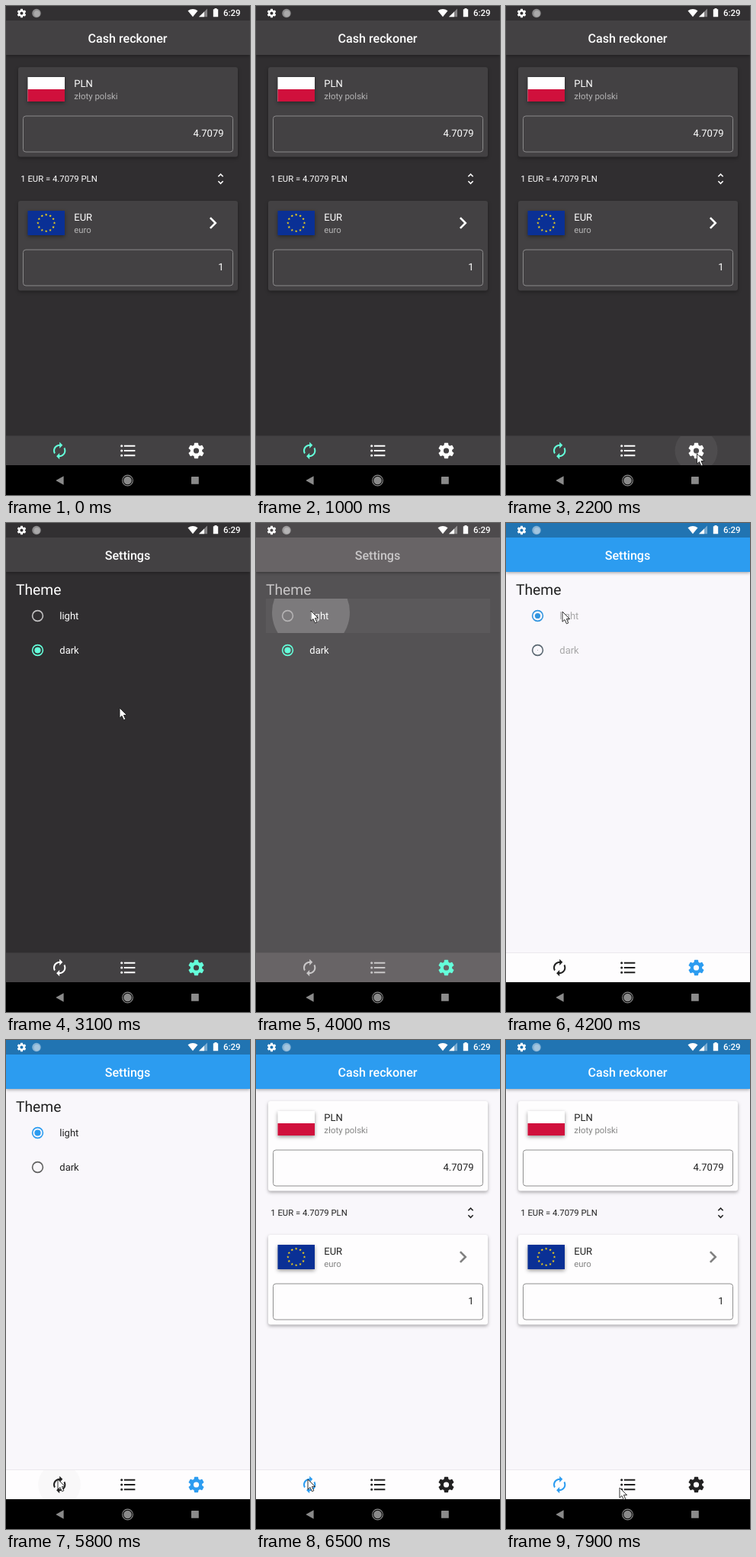
Animation, 320 px wide and 640 px high, one loop 8000 ms. Source, as an HTML page:

```html
<!DOCTYPE html>
<html lang="en">
<head>
<meta charset="utf-8">
<title>Currency app</title>
<style>
html, body { margin: 0; width: 100%; height: 100%; overflow: hidden; background: #000; }
svg { display: block; width: 320px; height: 640px; font-family: Roboto, "Noto Sans", sans-serif; text-rendering: geometricPrecision; }
.bar { fill: var(--bar); filter: drop-shadow(0 1.5px 2px rgba(0,0,0,.38)); }
.card { fill: var(--card); filter: drop-shadow(0 2px 2px rgba(0,0,0,.32)); }
.flag { filter: drop-shadow(0 2.5px 2.5px rgba(0,0,0,.4)); }
.text { fill: var(--text); }
.sub { fill: var(--sub); font-size: 11.4px; }
.label { fill: var(--label); }
.edge { fill: none; stroke: var(--edge); }
.m { font-size: 13px; }
.title { fill: var(--title); font-size: 16.1px; font-weight: 500; text-anchor: middle; }
.end { text-anchor: end; }
</style>
</head>
<body>
<svg id="stage" viewBox="0 0 320 640"></svg>
<script>
const LOOP = 8000, STEP = 100;

const KEYS = ['bar', 'bg', 'card', 'nav', 'title', 'text', 'sub', 'edge', 'icon', 'accent', 'chev', 'ring', 'line'];
const DARK = ['#434143', '#302e30', '#434143', '#434143', '#ffffff', '#ffffff', '#b4b3b4', '#8a898a', '#ffffff', '#64ffda', '#ffffff', '#c2c1c2', '#3a383a'];
const MID = ['#686466', '#545254', '#686466', '#686466', '#c9c7c8', '#c9c7c8', '#a8a7a8', '#8a898a', '#c9c7c8', '#64ffda', '#e0e0e0', '#b5b3b4', '#605d5f'];
const LIGHT = ['#2c9cf0', '#f9f7fb', '#fefdfe', '#fefdfe', '#ffffff', '#212121', '#868686', '#8f8f8f', '#212121', '#2c9cf0', '#808080', '#616161', '#ebe9ed'];

// Tracks: [time, value, ...], linear between rows
const THEME = [[3900, 0], [4000, 1], [4100, 1.62], [4200, 2]];
const PICK = [[4000, 0], [4100, .45], [4200, .88], [4300, 1]];
const LABEL = [[4100, 0], [4200, .39], [4300, .75], [4400, 1]];
const TAB = [[2200, 0], [2500, 1], [5800, 1], [6100, 0]];
const POINTER = [
  [1300, 326, 616], [1400, 312, 612], [1600, 284, 601], [1800, 263, 591], [2100, 250.5, 586],
  [2600, 250.5, 586], [2800, 230, 500], [3100, 149, 242], [3300, 95, 150], [3500, 72, 115],
  [4000, 72, 115], [4200, 74, 116], [4600, 74, 116], [4800, 80, 195], [5100, 85, 400],
  [5300, 74, 530], [5500, 68, 575], [6500, 68, 575], [6800, 95, 578], [7300, 140, 578],
  [7600, 149, 586]
];
// radius, opacity
const TILE = [[3700, 0, 0], [3800, 14, .2], [4000, 51, .2], [4100, 110, .12], [4200, 160, 0]];
const tapTrack = (t, o) => [[t - 200, 0, 0], [t - 100, 14, o], [t, 28, o], [t + 200, 48, o * .6], [t + 400, 54, 0]];
const TAP_GEAR = tapTrack(2200, .06), TAP_SWAP = tapTrack(5800, .02);

function at(track, t) {
  const i = track.findIndex(row => row[0] > t);
  if (i === 0) return track[0].slice(1);
  if (i < 0) return track[track.length - 1].slice(1);
  const a = track[i - 1], b = track[i], k = (t - a[0]) / (b[0] - a[0]);
  return a.slice(1).map((v, n) => v + (b[n + 1] - v) * k);
}

const rgb = c => c[0] === '#' ? [1, 3, 5].map(i => parseInt(c.slice(i, i + 2), 16)) : c.match(/\d+/g).map(Number);
function mix(a, b, k) {
  const p = rgb(a), q = rgb(b);
  return `rgb(${p.map((v, i) => Math.round(v + (q[i] - v) * k))})`;
}

function gearPath() {
  const tooth = [[-2.87, -6.93], [-2.49, -9.58], [-2, -10], [2, -10], [2.49, -9.58], [2.87, -6.93]];
  const pts = [];
  for (let k = 0; k < 6; k++) {
    const c = Math.cos(k * Math.PI / 3), s = Math.sin(k * Math.PI / 3);
    for (const [x, y] of tooth) pts.push(`${(12 + x * c - y * s).toFixed(2)} ${(12 + x * s + y * c).toFixed(2)}`);
  }
  return `M${pts.join('L')}ZM8.5 12a3.5 3.5 0 1 0 7 0a3.5 3.5 0 1 0-7 0Z`;
}

const ICON = {
  gear: gearPath(),
  swap: 'M12 6v3l4-4-4-4v3c-4.42 0-8 3.58-8 8 0 1.57.46 3.03 1.24 4.26L6.7 14.8c-.45-.83-.7-1.79-.7-2.8 0-3.31 2.69-6 6-6zm6.76 1.74L17.3 9.2c.44.84.7 1.79.7 2.8 0 3.31-2.69 6-6 6v-3l-4 4 4 4v-3c4.42 0 8-3.58 8-8 0-1.57-.46-3.03-1.24-4.26z',
  list: [6, 12, 18].map(y => `M2.5 ${y}a1.5 1.5 0 1 0 3 0a1.5 1.5 0 1 0-3 0zM7 ${y - 1}h14v2H7z`).join(''),
  unfold: 'M12 5.83L15.17 9l1.41-1.41L12 3 7.41 7.59 8.83 9zM12 18.17L8.83 15l-1.41 1.41L12 21l4.59-4.59L15.17 15z',
  next: 'M10 6L8.59 7.41 13.17 12l-4.58 4.59L10 18l6-6z'
};
const icon = (name, x, y, size, fill, id = '') =>
  `<path ${id && `id="${id}"`} d="${ICON[name]}" fill-rule="evenodd" style="fill:${fill}" transform="translate(${x} ${y}) scale(${size}) translate(-12 -12)"/>`;
const text = (x, y, cls, s, extra = '') => `<text x="${x}" y="${y}" class="${cls}" ${extra}>${s}</text>`;
const rect = (x, y, w, h, attrs) => `<rect x="${x}" y="${y}" width="${w}" height="${h}" ${attrs}/>`;
const circle = (x, y, r, attrs) => `<circle cx="${x}" cy="${y}" r="${r}" ${attrs}/>`;

function star(x, y, r) {
  const pts = Array.from({ length: 10 }, (_, i) => {
    const a = i * Math.PI / 5, q = i % 2 ? r * .4 : r;
    return `${(x + q * Math.sin(a)).toFixed(2)},${(y - q * Math.cos(a)).toFixed(2)}`;
  });
  return `<polygon points="${pts.join(' ')}" fill="#f7d417"/>`;
}
const polishFlag = rect(28.5, 93, 48.5, 32, 'fill="#fff"') + rect(28.5, 109, 48.5, 16, 'fill="#d0103c"');
const euroFlag = rect(28.5, 268, 48.5, 32, 'fill="#0a3095"') +
  Array.from({ length: 12 }, (_, i) => star(52.7 + 10.8 * Math.sin(i * Math.PI / 6), 284 - 10.8 * Math.cos(i * Math.PI / 6), 1.9)).join('');

const card = (y, flag, code, name, value) =>
  rect(16, y, 288, 117.5, 'rx="3" class="card"') +
  `<g class="flag">${flag}</g>` +
  text(89.3, y + 25.5, 'text m', code) + text(89.3, y + 41.8, 'sub', name) +
  rect(22.5, y + 64, 275, 47, 'rx="3.5" class="edge"') +
  text(285.5, y + 91.2, 'text m end', value);

const radio = (id, y, label) =>
  circle(41.5, y, 6.9, `id="${id}Ring" fill="none" stroke-width="1.6"`) +
  circle(41.5, y, 4, `id="${id}Dot"`) +
  text(70.3, y + 4.6, 'label m', label);

const statusBar =
  rect(0, 0, 320, 19, 'fill="#000" opacity=".26"') +
  icon('gear', 20.5, 9.5, .58, '#fff') +
  circle(40, 9.5, 5.7, 'fill="#fff" opacity=".45"') +
  circle(40.6, 10, 3.9, 'fill="#fff" opacity=".25"') +
  '<path d="M238.5 6.3Q245 1.8 251.5 6.3L245 14.3Z" fill="#fff"/>' +
  '<path d="M253 14.2H264V3.6Z" fill="#fff" opacity=".4"/><path d="M253 14.2H260V7.5Z" fill="#fff"/>' +
  '<path d="M273.5 3h3v1.3h1.7V14.3h-6.4V4.3h1.7z" fill="#fff"/>' +
  text(285, 13.4, '', '6:29', 'fill="#fff" font-size="11.5" font-weight="500"');

const systemBar =
  rect(0, 601, 320, 39, 'fill="#000"') +
  '<path d="M65.3 621L75.6 615.2V626.8Z" fill="#8a8a8a"/>' +
  circle(159.5, 621, 6.9, 'fill="none" stroke="#8a8a8a" stroke-width="1.1"') +
  circle(159.5, 621, 5.3, 'fill="#8a8a8a"') +
  rect(243, 616, 9.8, 9.8, 'rx=".6" fill="#8a8a8a"');

const stage = document.getElementById('stage');
stage.innerHTML = `
<clipPath id="navClip">${rect(0, 563, 320, 38, '')}</clipPath>
<clipPath id="tileClip">${rect(13, 99, 294, 45, '')}</clipPath>
${rect(0, 0, 320, 601, 'style="fill:var(--bg)"')}
<g id="home">
  ${card(80, polishFlag, 'PLN', 'złoty polski', '4.7079')}
  ${text(19.3, 230.2, 'text', '1 EUR = 4.7079 PLN', 'font-size="11.3"')}
  ${icon('unfold', 281.5, 226.2, .81, 'var(--icon)')}
  ${card(255, euroFlag, 'EUR', 'euro', '1')}
  ${icon('next', 271.4, 284, 1.3, 'var(--chev)')}
</g>
<g id="settings">
  ${text(13, 94.3, 'text', 'Theme', 'font-size="19.3"')}
  <g clip-path="url(#tileClip)">
    ${rect(13, 99, 294, 45, 'id="tile" fill="#fff"')}
    ${circle(72, 117, 0, 'id="tileRipple" fill="#fff"')}
  </g>
  ${radio('light', 121.5, 'light')}${radio('dark', 166.5, 'dark')}
</g>
${rect(0, 0, 320, 64, 'class="bar"')}
${statusBar}
${text(159.5, 48, 'title', '', 'id="title"')}
${rect(0, 562, 320, 1, 'style="fill:var(--line)"')}
${rect(0, 563, 320, 38, 'style="fill:var(--nav)"')}
<g clip-path="url(#navClip)">
  ${circle(249.5, 582, 0, 'id="gearRipple" fill="#fff"')}
  ${circle(70, 582, 0, 'id="swapRipple" fill="#000"')}
</g>
${icon('swap', 70.2, 582, 1.02, '', 'swapIcon')}
${icon('list', 160, 582, 1.04, 'var(--icon)')}
${icon('gear', 249.5, 582, 1.03, '', 'gearIcon')}
${systemBar}
<path id="pointer" d="M0 0V13.2L3 10.5L5.4 15.8L7.8 14.8L5.4 9.6H9.6Z" fill="#fff" stroke="#1c1c1c" stroke-width=".9" stroke-linejoin="round"/>`;

const el = {};
stage.querySelectorAll('[id]').forEach(n => el[n.id] = n);

function ripple(node, track, t) {
  const [r, o] = at(track, t);
  node.setAttribute('r', r);
  node.setAttribute('opacity', o);
}

function setRadio(id, on, off, accent) {
  const c = mix(off, accent, on);
  el[id + 'Ring'].setAttribute('stroke', c);
  el[id + 'Dot'].setAttribute('fill', c);
  el[id + 'Dot'].setAttribute('r', 4.1 * on);
}

function draw(t) {
  const [th] = at(THEME, t), [from, to] = th < 1 ? [DARK, MID] : [MID, LIGHT];
  const c = {};
  KEYS.forEach((k, i) => {
    c[k] = mix(from[i], to[i], th < 1 ? th : th - 1);
    stage.style.setProperty('--' + k, c[k]);
  });
  stage.style.setProperty('--label', mix('#ffffff', '#212121', at(LABEL, t)[0]));

  const inSettings = t >= 2300 && t < 5900;
  el.home.style.display = inSettings ? 'none' : '';
  el.settings.style.display = inSettings ? '' : 'none';
  el.title.textContent = inSettings ? 'Settings' : 'Cash reckoner';

  const [tab] = at(TAB, t);
  el.gearIcon.style.fill = mix(c.icon, c.accent, tab);
  el.swapIcon.style.fill = mix(c.accent, c.icon, tab);

  const [pick] = at(PICK, t);
  setRadio('light', pick, c.ring, c.accent);
  setRadio('dark', 1 - pick, c.ring, c.accent);

  ripple(el.tileRipple, TILE, t);
  el.tile.setAttribute('opacity', at(TILE, t)[1] * .22);
  ripple(el.gearRipple, TAP_GEAR, t);
  ripple(el.swapRipple, TAP_SWAP, t);

  const [x, y] = at(POINTER, t);
  el.pointer.setAttribute('transform', `translate(${x} ${y})`);
}

const start = performance.now();
function tick() {
  const t = (performance.now() - start) % LOOP;
  draw(Math.floor(t / STEP) * STEP);
  requestAnimationFrame(tick);
}
tick();
</script>
</body>
</html>
```
